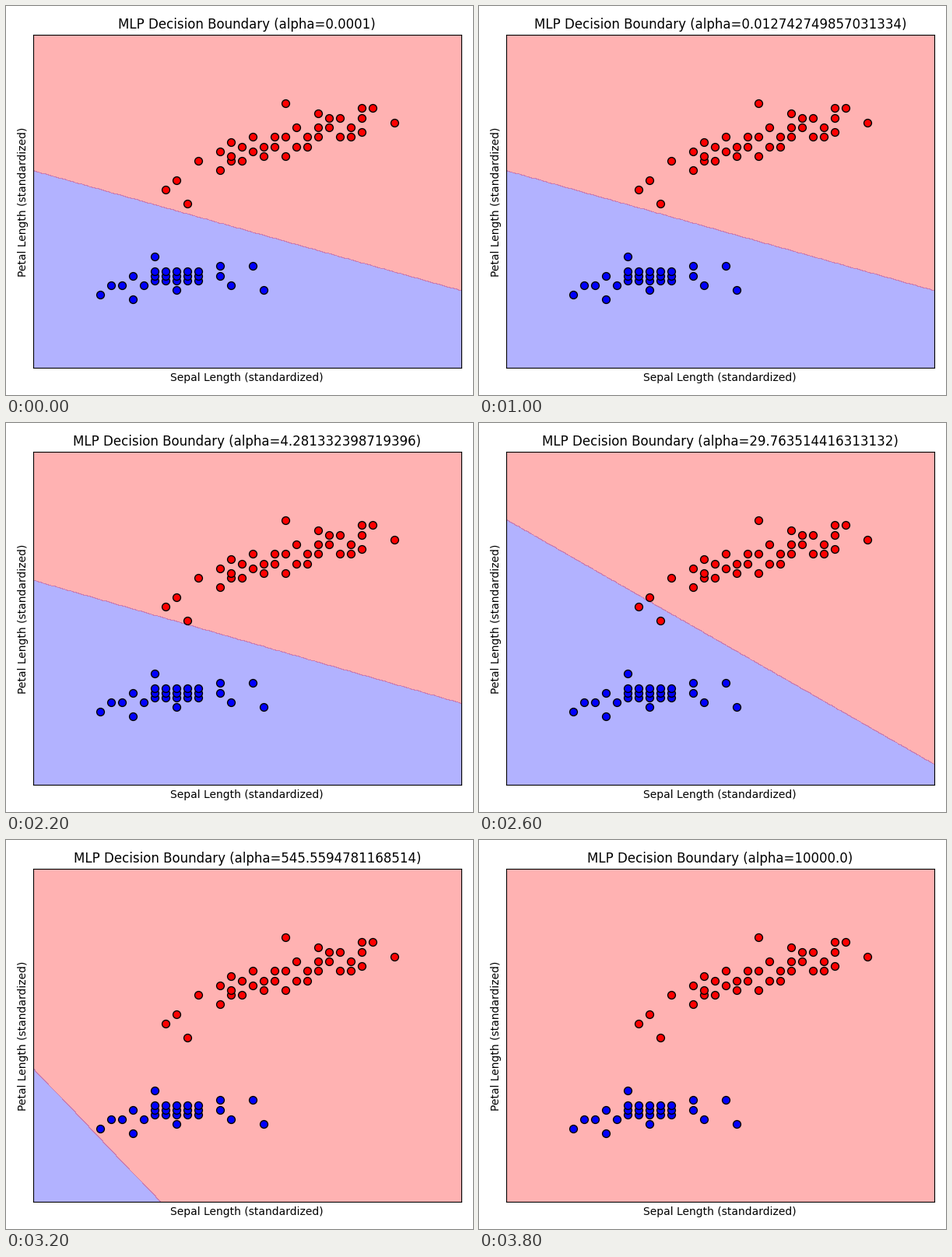
Write a matplotlib script that moves like this. It is 600x500 px and loops after 4 s.

```python
import numpy as np
import matplotlib.pyplot as plt
from matplotlib.animation import FuncAnimation
from matplotlib.colors import ListedColormap

plt.rcParams["font.family"] = "DejaVu Sans"

FRAMES, INTERVAL = 20, 200
ALPHAS = np.logspace(-4, 4, FRAMES)
XLIM = (3.686, 7.614)
YLIM = (-0.43, 6.53)
CMAP = ListedColormap(["blue", "red"])

# Points lie on a 0.1 grid: (steps right of 4.3, height in tenths)
RED_EDGE = [(8, 30), (6, 33), (7, 35), (9, 39),
            (17, 51), (20, 49), (24, 50), (27, 47)]
BLUE_EDGE = [(0, 11), (3, 10), (3, 15), (5, 19), (7, 12),
             (11, 15), (12, 13), (11, 17), (14, 17), (15, 12)]


def red_cloud(n=30):
    """Rising band, spread evenly around its axis by the golden ratio."""
    i = np.arange(n)
    x = np.round(11 + 14 * (i / (n - 1)) ** 1.15)
    spread = 6 * (i * 0.618 % 1 - 0.5)
    return np.column_stack([x, np.round(40.6 + 0.5 * (x - 12) + spread)])


def blue_cloud():
    """Dense block with a short tail to the lower left."""
    block = [(x, y) for y in (14, 15, 16) for x in range(5, 10)]
    return block + [(x, 13) for x in (1, 2, 4)]


def boundary(i):
    """Height of the line at the centre, and its drop across the plot."""
    alpha = ALPHAS[i]
    rise = 0.2 * alpha / (alpha + 2.5)
    middle = 2.443 + rise - 4.96 * (alpha / ALPHAS[16]) ** 1.5
    drop = 2.51 + rise / 2 + 1.19 * np.clip(i - 11, 0, 5) ** 1.08
    return middle, drop


def scatter(points, color):
    x, y = np.asarray(points).T / 10
    ax.scatter(4.3 + x, y, s=50, c=color, edgecolors="k",
               linewidths=1, zorder=2)


fig, ax = plt.subplots(figsize=(6, 5), dpi=100)
ax.set(xlim=XLIM, ylim=YLIM, xticks=[], yticks=[],
       xlabel="Sepal Length (standardized)",
       ylabel="Petal Length (standardized)")
title = ax.set_title("MLP Decision Boundary (alpha=0.0001)")
fig.tight_layout()

scatter(np.vstack([blue_cloud(), BLUE_EDGE]), "blue")
scatter(np.vstack([red_cloud(), RED_EDGE]), "red")

xx, yy = np.meshgrid(np.linspace(*XLIM, 636), np.linspace(*YLIM, 496))
across = (xx - XLIM[0]) / (XLIM[1] - XLIM[0]) - 0.5
regions = []


def draw(i):
    while regions:
        regions.pop().remove()
    middle, drop = boundary(i)
    labels = (yy > middle - drop * across).astype(float)
    regions.append(ax.contourf(xx, yy, labels, levels=[-0.5, 0.5, 1.5],
                               cmap=CMAP, alpha=0.3, zorder=1))
    ax.set(xlim=XLIM, ylim=YLIM)
    title.set_text(f"MLP Decision Boundary (alpha={ALPHAS[i]})")
    return [title]


anim = FuncAnimation(fig, draw, frames=FRAMES, interval=INTERVAL,
                     init_func=lambda: draw(0), repeat=True, repeat_delay=0)
plt.show()
```
